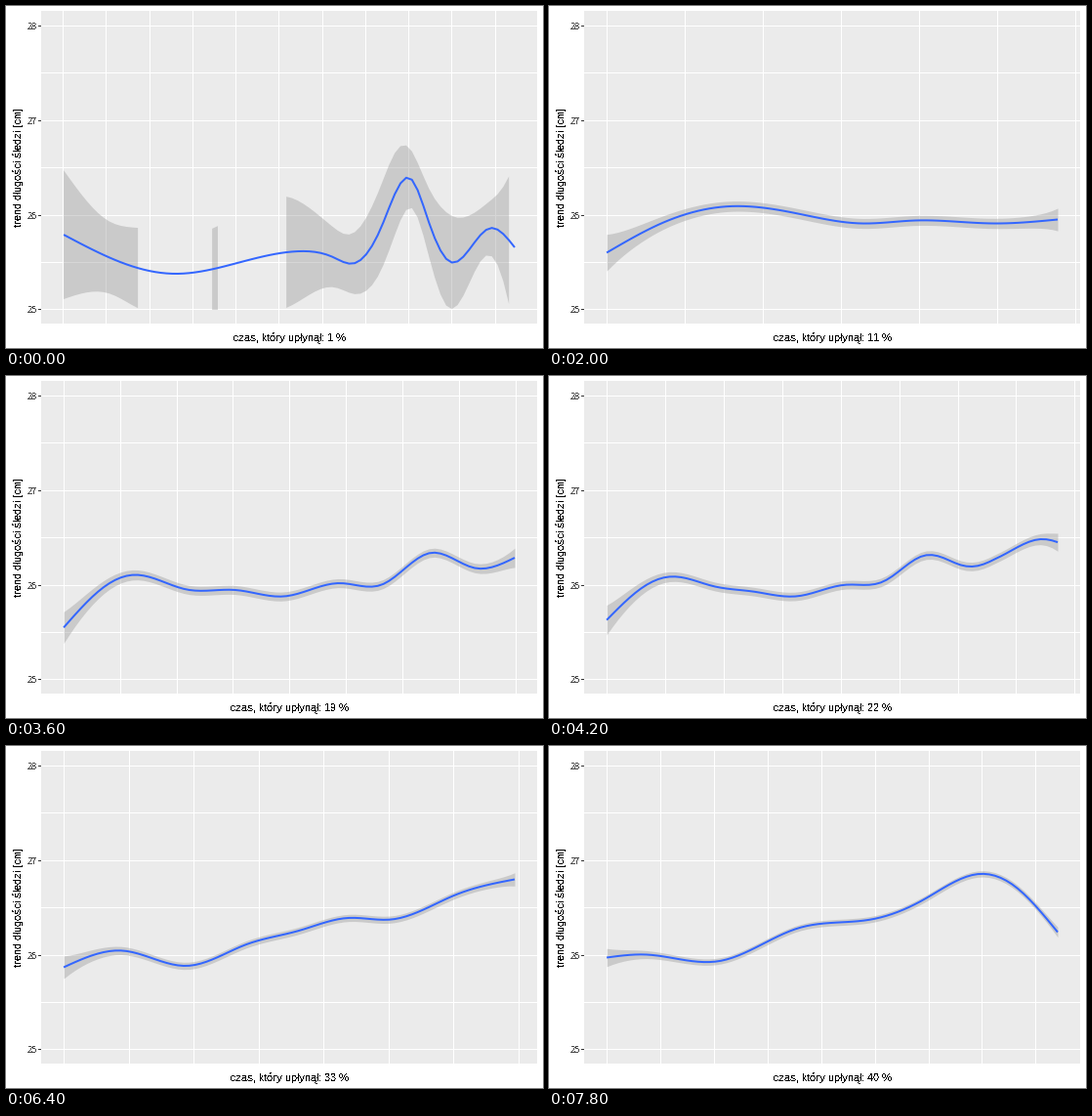
A matplotlib script for the animation above (8000 ms loop, 550x350 px).

```python
import math

import numpy as np
import matplotlib.pyplot as plt
from matplotlib.animation import FuncAnimation
from matplotlib.patches import Rectangle

W, H, DPI = 550, 350, 100
PX = 72 / DPI
LEFT, RIGHT, TOP, BOTTOM = 36, 544, 5, 325
X0, X1 = 59.1, 521
SPAN = X1 - X0
STEPS = 40

plt.rcParams.update({
    "font.family": ["Liberation Sans", "DejaVu Sans"],
    "text.hinting": "native",
    "text.hinting_factor": 1,
    "text.antialiased": False,
})
fig = plt.figure(figsize=(W / DPI, H / DPI), dpi=DPI, facecolor="white")
ax = fig.add_axes([0, 0, 1, 1])


def spline(*knots):
    """Natural cubic spline through (x, y) knots."""
    x, y = np.array(knots, float).T
    h, n = np.diff(x), len(x)
    a, b = np.eye(n), np.zeros(n)
    for i in range(1, n - 1):
        a[i, i - 1:i + 2] = h[i - 1], 2 * (h[i - 1] + h[i]), h[i]
        b[i] = 6 * ((y[i + 1] - y[i]) / h[i] - (y[i] - y[i - 1]) / h[i - 1])
    m = np.linalg.solve(a, b)

    def value(v):
        v = np.clip(v, x[0], x[-1])
        i = np.clip(np.searchsorted(x, v) - 1, 0, n - 2)
        p, q, d = x[i + 1] - v, v - x[i], h[i]
        return ((m[i] * p ** 3 + m[i + 1] * q ** 3) / (6 * d)
                + (y[i] / d - m[i] * d / 6) * p
                + (y[i + 1] / d - m[i + 1] * d / 6) * q)

    return value


# Turning points of the trend at a few percentages, in pixels
trend = {
    1: spline((59, 234), (140, 269.5), (175, 274), (235, 263.5), (300, 251),
              (335, 257), (356, 263.5), (385, 225), (415, 177), (433, 221),
              (455, 262), (495, 227.5), (521, 247)),
    7: spline((59, 246.5), (195, 212), (275, 205), (390, 213.5), (521, 234)),
    11: spline((59, 252.5), (115, 222.5), (185, 205), (250, 211.5),
               (320, 222.5), (375, 219.5), (455, 222.5), (521, 218.5)),
    19: spline((59, 257.5), (103, 214), (132, 203.5), (185, 218.5),
               (235, 219), (285, 225.5), (342, 212), (385, 213.5),
               (435, 181), (480, 196.5), (521, 186)),
    26: spline((59, 239.5), (126, 206), (195, 225), (270, 215), (305, 204.5),
               (348, 184.5), (380, 193), (436, 167), (482, 183), (521, 162.5)),
    33: spline((59, 226.5), (120, 209.5), (185, 225), (245, 203.5),
               (300, 189), (350, 176), (395, 177.5), (460, 152.5),
               (521, 136.5)),
    40: spline((59, 216.5), (100, 213.5), (175, 220), (255, 186.5),
               (330, 177.5), (385, 156.5), (440, 131), (475, 142),
               (521, 190.5)),
}
early_band = spline((59, 66), (105, 37), (140, 42), (208, 41), (290, 56),
                    (347, 29), (400, 41), (419, 28), (452, 48), (486, 27),
                    (508, 45), (521, 85))


def curve(p, x):
    """Centre line at p percent, blended in data time between known shapes."""
    if p in trend:
        return trend[p](x)
    hi = min(k for k in trend if k > p)
    lo = max(k for k in trend if k < p)
    w = (p - lo) / (hi - lo)
    if lo == 1:
        w = math.sqrt(w)
    t = p * (x - X0) / SPAN
    new = trend[hi](X0 + SPAN * t / hi)
    gap = trend[lo](X1) - trend[hi](X0 + SPAN * lo / hi)
    old = np.where(t <= lo, trend[lo](X0 + SPAN * t / lo),
                   new + gap * np.exp(-np.maximum(t - lo, 0) / 0.8))
    return (1 - w) * old + w * new


def half_band(p, x):
    """Half height of the band; it narrows as the data grow."""
    late = (5.8 - 0.065 * p
            + (16.5 - 0.26 * p) * np.exp((X0 - x) / (18 + 120 / p))
            + (8.2 - 0.155 * p) * np.exp((x - X1) / (10 + 70 / p)))
    w = max(0, 1 - math.sqrt((p - 1) / 6)) ** 1.5
    return w * early_band(x) + (1 - w) * late


def nice_step(n):
    """Tick step for 1..n, scored by simplicity, coverage and density."""
    best, choice = -9, None
    for i, q in enumerate([1, 5, 2, 2.5, 4, 3]):
        for z in range(1, 5):
            step = q * 10 ** z
            for k in range(3, 7):
                top = step * (k - 1)
                cover = 1 - 0.5 * ((n - top) / (0.1 * n)) ** 2
                ratio = (k - 1) / top * max(top, n) / 4
                dense = 2 - max(ratio, 1 / ratio)
                score = 0.25 * (1 - i / 5) + 0.2 * cover + 0.5 * dense
                score -= 0.02 * (q == 4)
                if score > best:
                    best, choice = score, step
    return choice


def y_px(cm):
    return 20 + (28 - cm) * 96.83


def box(x, y, w, h, color, z=1):
    ax.add_patch(Rectangle((x, y), w, h, fc=color, lw=0, aa=False, zorder=z))


def draw_panel(n):
    box(LEFT, TOP, RIGHT - LEFT, BOTTOM - TOP, "#ebebeb", 0)
    for cm in np.arange(25, 28.5, 0.5):
        y = round(y_px(cm))
        box(LEFT, y, RIGHT - LEFT, 1, "white")
        if cm == int(cm):
            box(LEFT - 3, y, 3, 1, "#333333")
            ax.text(32, y + 4, f"{cm:.0f}", size=9 * PX, color="#4d4d4d",
                    ha="right", va="baseline")
    half = nice_step(n) / 2
    for i in range(14):
        x = X0 + SPAN * (i * half - 1) / (n - 1)
        if x > 541:
            break
        box(round(x), TOP, 1, BOTTOM - TOP, "white")


def draw(i):
    p = i + 1
    ax.clear()
    ax.set_xlim(0, W)
    ax.set_ylim(H, 0)
    ax.axis("off")
    draw_panel(526 * p - 3 - p // 5)

    x = np.linspace(X0, X1, 80)
    y, d = curve(p, x), half_band(p, x)
    ax.fill_between(x, y - d, y + d, where=y + d <= y_px(25) + 0.5,
                    color="#999999", alpha=0.4, lw=0, zorder=2)
    ax.plot(x, y, color="#3366ff", lw=2 * PX, zorder=3,
            solid_capstyle="butt")

    ax.text(290, 343, f"czas, który upłynął: {p} %", size=11 * PX,
            color="black", ha="center", va="baseline")
    ax.text(13, 165, "trend długości śledzi [cm]", size=11 * PX,
            color="black", rotation=90, ha="center", va="center")
    return []


anim = FuncAnimation(fig, draw, frames=STEPS, interval=200, repeat=True,
                     repeat_delay=0, init_func=lambda: draw(0))
plt.show()
```
